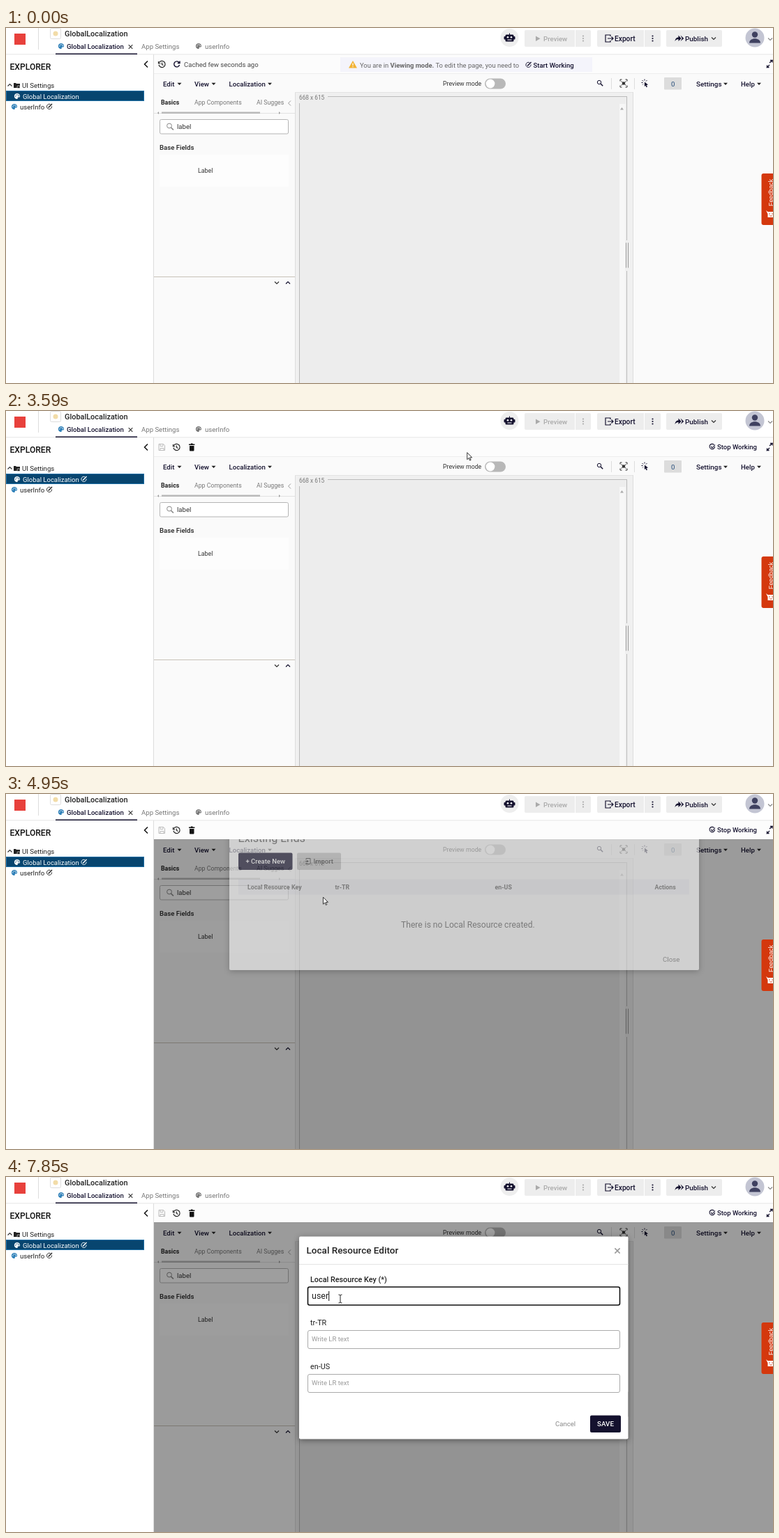
These frames come from a looping animation (1099 px wide and 510 px high, 8000 ms). An HTML page:

```html
<!DOCTYPE html>
<html lang="en">
<head>
<meta charset="utf-8">
<title>Local resource editor walkthrough</title>
<style>
html, body { margin: 0; width: 100%; height: 100%; overflow: hidden; background: #fff; }
svg { display: block; width: 1099px; height: 510px; font-family: Roboto, sans-serif; }
text { white-space: pre; }
.shadow { filter: drop-shadow(0 2px 4px rgba(0,0,0,.4)); }
</style>
</head>
<body>
<script>
const INK = '#14112e', GRAY = '#777';

// Static drawing helpers; text is placed by the middle of its capitals.
const text = (x, y, s, size = 9.6, fill = '#222', weight = 400) =>
  `<text x="${x}" y="${y + size * .345}" font-size="${size}" fill="${fill}" font-weight="${weight}">${s}</text>`;
const rect = (x, y, w, h, fill, r = 0, stroke = 'none', sw = 1) =>
  `<rect x="${x}" y="${y}" width="${w}" height="${h}" rx="${r}" fill="${fill}" stroke="${stroke}" stroke-width="${sw}"/>`;
const circle = (x, y, r, fill, stroke = 'none') =>
  `<circle cx="${x}" cy="${y}" r="${r}" fill="${fill}" stroke="${stroke}"/>`;
const line = (d, stroke = '#222', w = 1.2, fill = 'none') =>
  `<path d="${d}" stroke="${stroke}" stroke-width="${w}" fill="${fill}"/>`;
const shape = (d, fill = '#222') => `<path d="${d}" fill="${fill}"/>`;
const group = (id, body) => `<g id="${id}">${body}</g>`;
const at = (x, y, body) => `<g transform="translate(${x} ${y})">${body}</g>`;

const caret = (x, y) => shape(`M${x - 3} ${y - 1.5}h6l-3 3.2z`);
const chevron = (x, y, dir, color = '#333') => line(`M${x - 3} ${y - 1.5 * dir}l3 ${3 * dir}l3 ${-3 * dir}`, color, 1.2);
const cross = (x, y, r, color, w = 1.5) => line(`M${x - r} ${y - r}l${2 * r} ${2 * r}m0 ${-2 * r}l${-2 * r} ${2 * r}`, color, w);
const dots = (x, y, color) => [-3.5, 0, 3.5].map(d => circle(x, y + d, 1.1, color)).join('');
const palette = (x, y, fill, hole = '#fff') => at(x, y,
  shape('M0 -4C-5.5 -4 -5.5 4 0 4C1.6 4 .2 2 1.2 1.6C2.4 1.2 4 2 4 0C4 -2.8 2.2 -4 0 -4z', fill) +
  [[-2.2, 0], [-1, -2.1], [1.1, -2.1], [2.4, -.5]].map(([a, b]) => circle(a, b, .7, hole)).join(''));
const editIcon = (x, y, color) => at(x, y,
  line('M1.5 -3.4A3.6 3.6 0 1 0 3.6 -.5', color, .9) + line('M-1.4 1.4L4 -4', color, 1.4));
const history = (x, y) => at(x, y, line('M-4 -2.4A4.6 4.6 0 1 1 -4.5 1M-5 -4v3h3M0 -2.6V.4l2 1.2'));
const lens = (x, y, r, color) => at(x, y, circle(-1, -1, r, 'none', color) + line(`M${r * .6 - .6} ${r * .6 - .6}L${r + 1.5} ${r + 1.5}`, color, 1.5));
const menu = (x, y, s, arrowX) => text(x, y, s, 9.6, INK, 500) + caret(arrowX, y);

const robot = shape('M-4.5 -4.5h4v-2h1v2h4a1.5 1.5 0 0 1 1.500 1.500v7a1.500 1.500 0 0 1 -1.500 1.500h-9a1.500 1.500 0 0 1 -1.500 -1.500v-7a1.500 1.500 0 0 1 1.500 -1.500z', INK) +
  rect(-8, -2, 16, 4.5, INK, 1) + circle(-2.5, -.8, 1.3, '#fff') + circle(2.5, -.8, 1.3, '#fff') + rect(-3, 2.5, 6, 1, '#fff');

const header =
  rect(0, 0, 1099, 38, '#fff') + rect(12, 8, 16, 16, '#e8413c') + rect(46, 0, 1, 31, '#ddd') +
  rect(63.5, .5, 15, 15, '#fff', 2, '#ddd') + circle(71, 8, 3.5, '#f2dca8') +
  text(84, 8.5, 'GlobalLocalization', 10.9, '#222', 500) +
  palette(79, 26, '#2c7fb8') + text(87, 26.5, 'Global Localization', 9.55, INK, 500) + cross(178.5, 27, 2.8, '#333', 1.1) +
  text(194, 26.5, 'App Settings', 9.6, GRAY) + palette(276, 26, GRAY) + text(285, 26.5, 'userInfo', 9.6, GRAY) +
  rect(0, 37.5, 1099, 1, '#ddd') + rect(71, 36.5, 117, 1.5, INK) +
  circle(721.5, 14, 13, '#eee') + at(721.5, 14, robot) +
  rect(743, 3, 95, 24, '#ededed', 2) + rect(815, 3, 1, 24, '#fff') + shape('M759 11.5v7.500l6.500 -3.750z', '#aaa') +
  text(770, 15.5, 'Preview', 9.7, '#aaa', 500) + dots(827, 15, '#aaa') +
  rect(847, 3, 91, 24, '#ededed', 2) + rect(914, 3, 1, 24, '#fff') +
  line('M866 12v-2h-7v10h7v-2M862 15h8m-2.500 -2.500l2.500 2.500l-2.500 2.500', INK, 1.2) +
  text(872, 15.5, 'Export', 10.2, INK, 500) + dots(926.5, 15, INK) +
  rect(946, 3, 80, 24, '#ededed', 2) +
  shape('M958.500 19c.5-4 2.500-5.500 5-5.500v-3l4 4.500l-4 4v-3c-2 0-3.500 .8-5 3zM966.500 10.500l4.800 4.500l-4.800 4l2.200 -4z', INK) +
  text(973, 15.5, 'Publish', 9.9, INK, 500) + chevron(1014, 15, 1) +
  circle(1073, 14, 13.5, '#c3c5d3') + circle(1073, 9.500, 4.2, '#3f4160') + shape('M1065 21.500c0-8.500 16-8.500 16 0z', '#3f4160') + chevron(1095, 16, 1, '#888');

const explorer =
  rect(0, 38.500, 211, 472, '#fff') + text(5.500, 55.5, 'EXPLORER', 12.1, '#111', 500) +
  line('M203 47.500l-4.500 4.500l4.500 4.500', '#111', 1.5) +
  chevron(5.500, 82, -1) + shape('M11 79h3l1 1h5v6h-9z') + rect(16, 83, 4, 3.5, '#222', 1, '#fff', .6) +
  text(23, 82.5, 'UI Settings') +
  rect(.5, 90.5, 197, 14, '#07456f', 0, '#1d6ea5') + palette(16, 98, '#fff', '#07456f') +
  text(24, 98.3, 'Global Localization', 9.5, '#fff') + group('rowEdit', editIcon(111.500, 98, '#fff')) +
  palette(12, 113, '#2c7fb8') + text(20, 113.3, 'userInfo') + editIcon(62, 113, '#222') +
  rect(211, 38, 1, 472, '#ddd');

const viewingBar = history(223.500, 52) +
  line('M248 49.500a4 4 0 1 0 .6 3.500M249 47.500v3h-3.200', INK, 1.4) + text(255, 52.5, 'Cached few seconds ago', 9.55, '#444') +
  rect(479, 42, 361, 21, '#f4f4fb') + shape('M497 47l6 10.500h-12z', '#f2b233') + rect(496.400, 50.500, 1.2, 3.5, '#fff') + rect(496.400, 55, 1.2, 1.2, '#fff') +
  text(507, 53.3, 'You are in <tspan font-weight="700">Viewing mode.</tspan> To edit the page, you need to', 9.42, '#666') +
  editIcon(748.500, 53, INK) + text(755.500, 53.3, 'Start Working', 9.5, INK, 500);

const workingBar =
  line('M219 47.500h6.500l2 2v7h-8.500zM221 47.500v3h4v-3M221 56.500v-3h5v3', '#bbb', 1) + history(244.500, 52) +
  shape('M262 47.500h2.500l.7-1h2l.7 1h2.500v1.500h-8.400zM263 50h6.500v6c0 1-.5 1.500-1.300 1.500h-4c-.8 0-1.200-.5-1.200-1.500z', '#111') +
  line('M1014.500 48.500a3.700 3.700 0 1 0 1 2.500M1010 51l2 2l4-4.500', INK, 1.1) +
  text(1019, 52, 'Stop Working', 9.5, INK, 500);

const toolbar = rect(212, 38.500, 887, 27, '#fcfcfc') + group('viewing', viewingBar) + group('working', workingBar) +
  line('M1094 50l4-3.500h-3m3 0v3M1094 53l-3.500 3.500h3m-3 0v-3', INK, 1.3);

const menubar = rect(212, 65, 887, 27.5, '#fafafa') + rect(212, 65, 887, 1, '#eee') +
  menu(225, 80.3, 'Edit', 248.500) + menu(270, 80.3, 'View', 297.500) + menu(319.500, 80.3, 'Localization', 378) +
  text(626, 80.3, 'Preview mode', 8.8, '#333') + rect(686, 72.5, 30, 15, '#b8b8b8', 7.5) + circle(694, 80, 6.4, '#fff') +
  lens(851, 79, 2.7, INK) + rect(867, 72, 1, 16, '#ddd') + rect(900, 72, 1, 16, '#ddd') +
  at(885, 79.500, line('M-5 -3v-2.500h2.500M5 -3v-2.500h-2.500M-5 3v2.500h2.500M5 3v2.500h-2.500', '#333', 1) +
    circle(0, 0, 2.2, '#333') + line('M-3.500 -3l7 6m0 -6l-7 6', '#333', 1)) +
  at(915, 78.500, shape('M0 -1l5 4l-2.300 .5l1.300 2.500l-1.500 .7l-1.200 -2.600l-1.500 1.600z', INK) + line('M0 -3v-2M-2 -2l-1.500 -1.500M2 -2l1.500 -1.500M-2.500 0h-2M-2 2l-1 1', INK, 1)) +
  rect(943, 71, 25, 17.5, '#dcdcdc', 1) + text(953, 80.3, '0', 9.6, '#234a78') +
  text(989, 80.3, 'Settings', 9.9, INK, 500) + caret(1031, 80.3) + text(1053, 80.3, 'Help', 9.6, INK, 500) + caret(1079, 80.3);

const panel = rect(212, 92, 202, 418, '#fafafa') +
  text(222, 107.3, 'Basics', 8.8, '#222', 700) + text(270, 107.3, 'App Components', 8.75, GRAY) +
  text(359, 107.3, 'AI Sugges', 8.75, GRAY) + line('M408 104.500l-3.500 3.500l3.500 3.500', '#999', 1) +
  rect(212, 122, 202, 1, '#e2e2e2') + rect(223, 120.5, 141, 2.5, '#b9b9b9') +
  shape('M219 120v4l-2-2zM391 120v4l2-2z', '#999') +
  rect(220.5, 131.5, 184, 20.5, '#fff', 2, '#b5b5b5') + lens(235, 141.500, 3.4, '#888') + text(245, 141.8, 'label', 9.6, '#333') +
  text(220, 171.8, 'Base Fields', 9.6, '#222', 500) +
  rect(220, 182, 185, 46, '#fdfdfd') + text(275, 205, 'Label', 8.8, '#333') +
  rect(212, 357, 202, 1, '#c8c2b8') + chevron(388, 366, 1) + chevron(404, 366, -1, INK);

const stage = rect(414, 92, 485, 418, '#f0f0f0') + rect(421, 108, 458, 402, '#ededed') + rect(421, 99, 468, 10, '#ededed') +
  rect(414, 92, 1, 418, '#ddd') + rect(414, 92, 685, 1, '#e4e4e4') +
  text(420, 100.500, '668 x 615', 8.3, '#777') + rect(461, 98, 429, 1, '#bbb') + rect(420, 108, 1, 402, '#bbb') +
  rect(879, 109, 8, 401, '#f7f7f7') + shape('M880 117.500l2.500-3.500l2.500 3.500z', '#aaa') +
  rect(889, 98, 1, 207, '#bbb') + rect(889, 349, 1, 161, '#bbb') + rect(888, 308.5, 1, 36, '#999') + rect(891, 308.5, 1, 36, '#999') +
  rect(899, 92, 200, 418, '#fafafa') + rect(898, 92, 1, 418, '#ddd');

const dropdown = rect(313, 71.500, 79, 18, '#fff', 2, '#ddd') +
  `<g class="shadow">${rect(313, 90, 134, 79, '#fff', 1)}</g>` + rect(313, 88, 79, 3, '#fff') +
  group('hover', rect(313, 97, 134, 21.5, '#e0e0e0')) +
  menu(319.500, 80.3, 'Localization', 378) +
  text(319.500, 107.5, 'Local Resources', 9.4, INK, 500) + text(319.500, 129.3, 'Languages', 9.45, INK, 500) +
  shape('M432 126.500l3.500 2.500l-3.500 2.500z') + text(319.500, 151.3, 'Add Language', 9.5, INK, 500);

const listDialog = `<g class="shadow">${rect(320, 82, 673, 252.5, '#fdfdfd', 2)}</g>` +
  text(329.500, 102, 'Local Resource Editor', 13.5, '#222', 500) + cross(977.500, 102.500, 3.6, '#999') + rect(320, 121.5, 673, 1, '#e4e4e4') +
  text(332.500, 145, 'Existing Lrids', 16.2, '#555') +
  rect(333, 166, 77.5, 24.5, INK, 2) + text(343.500, 178.3, '+ Create New', 9.45, '#fff', 500) +
  rect(417, 166, 63, 24.5, '#c8c8c8', 2) + line('M430 176v-2h6v8h-6v-2M428.500 178h4.500m-1.500 -1.500l1.500 1.500l-1.500 1.500', '#444', 1) +
  text(440.500, 178.3, 'Import', 9.5, '#444', 500) +
  rect(333, 204, 646, 22, '#f2f2f6') +
  [[346, 'Local Resource Key'], [471.500, 'tr-TR'], [700.500, 'en-US'], [929.500, 'Actions']].map(([x, s]) => text(x, 215.2, s, 8.8, '#666', 700)).join('') +
  text(566, 269, 'There is no Local Resource created.', 12.1, '#666') + text(941, 319, 'Close', 9.7, '#777');

const field = (y, label, stroke, w) => text(436, y - 24, label, 10.8, '#222', w > 1 ? 500 : 400) +
  rect(432.500, y - 13, 447, 26, '#fff', 2.5, stroke, w);
const editDialog = `<g class="shadow">${rect(420, 85.500, 471.5, 291, '#fff', 2)}</g>` +
  text(430.500, 105.4, 'Local Resource Editor', 13.5, '#222', 500) + cross(876, 106, 3.6, '#999') + rect(420, 125, 471.5, 1, '#e4e4e4') +
  field(171, 'Local Resource Key (*)', '#111', 1.6) + field(233.5, 'tr-TR', '#aaa', 1) + field(296.5, 'en-US', '#aaa', 1) +
  text(438, 232.8, 'Write LR text', 9.5, '#999') + text(438, 296, 'Write LR text', 9.5, '#999') +
  `<text id="typed" x="438" y="175" font-size="12.500" fill="#222"></text>` + group('beam', rect(0, 164, 1, 14, '#111')) +
  text(787, 355, 'Cancel', 9.6, '#888') + group('save', rect(837, 342.5, 44, 24.5, INK, 2) + text(847, 355, 'SAVE', 9.8, '#fff', 500));

const feedback = rect(1082.5, 209, 20, 74, '#d4380d', 3) +
  `<text transform="translate(1098.500 256) rotate(-90)" font-size="8.900" fill="#fff" font-family="Liberation Sans, Arial, sans-serif">Feedback</text>` +
  shape('M1089 262l2.500 2h8v8h-8v-5z', '#fff') + circle(1094, 267, .8, '#d4380d') + circle(1098, 267, .8, '#d4380d') + line('M1094 269.500q2 1.500 4 0', '#d4380d', .8);

const cursors =
  group('arrow', line('M0 0v10l2.300-2.200l1.600 3.500l1.500-.7l-1.600-3.400h3.200z', '#222', .9, '#fff')) +
  group('hand', line('M-1 .8c0-1.200 1.800-1.200 1.800 0v4.200c.6-.8 1.700-.5 1.700 .3c.5-.6 1.500-.4 1.500 .4c.6-.5 1.300-.1 1.300 .6v3.200l-1.200 3.700h-5.200c-1-2-2.300-3.500-3.300-5.200c-.4-1 .8-1.500 1.600-.7l1.800 1.500z', '#222', .9, '#fff')) +
  group('ibeam', line('M-2.500 -6q2.500 0 2.500 1.500v9q0 1.500 -2.500 1.500M2.500 -6q-2.500 0 -2.500 1.500m0 9q0 1.500 2.500 1.500', '#222', 1));

document.body.innerHTML = `<svg viewBox="0 0 1099 510">
  <defs>
    <clipPath id="work"><rect x="212" y="65" width="887" height="445"/></clipPath>
    <linearGradient id="veilFill">${[[0, .36], [.2, .5], [.4, .66], [.7, .62], [.92, .33], [1, .33]].map(([o, a]) =>
      `<stop offset="${o}" stop-color="#fff" stop-opacity="${a}"/>`).join('')}</linearGradient>
  </defs>
  ${header + explorer + toolbar + menubar + panel + stage}
  ${group('menu', dropdown)}
  <g clip-path="url(#work)">${group('dim', rect(212, 65, 887, 445, '#000')) + group('list', listDialog) + group('edit', editDialog)}</g>
  ${group('veil', rect(0, 0, 1099, 510, 'url(#veilFill)') + rect(524, 240, 60, 59, INK))}
  ${feedback}
  ${group('click', circle(0, 0, 8, '#eadb0c'))}
  ${group('pointer', cursors)}
</svg>`;

const el = id => document.getElementById(id);
const show = (id, opacity) => el(id).setAttribute('opacity', +opacity);
const move = (id, x, y) => el(id).setAttribute('transform', `translate(${x} ${y})`);
const ramp = (t, from, to) => Math.min(1, Math.max(0, (t - from) / (to - from)));
const within = (t, from, to) => t >= from && t < to;

// Pointer stops: time, x, y
const route = [
  [210, 1066, 498], [540, 870, 281], [740, 870, 281], [880, 848, 280], [1210, 848, 279], [1350, 785, 118],
  [1560, 785, 117], [1910, 782, 57], [3480, 781, 56], [3720, 521, 64], [3790, 510, 65], [4120, 350, 79],
  [4270, 352, 83], [4340, 378, 134], [4480, 368, 108], [4780, 368, 108], [4950, 454, 148], [5160, 546, 191],
  [5320, 546, 191], [5480, 455, 191], [5550, 453, 190], [5960, 388, 177], [6450, 388, 177], [6840, 474, 171],
  [6910, 474, 171], [6980, 479, 175], [8000, 479, 175]];
const clicks = [2110, 4050, 4690, 6100];
const keys = [7380, 7590, 7780, 7850];

function pointerAt(t) {
  const i = Math.max(1, route.findIndex(stop => stop[0] > t));
  const [a, b] = [route[i - 1], route[i]];
  const p = ramp(t, a[0], b[0]);
  return [1, 2].map(k => a[k] + (b[k] - a[k]) * p);
}

function draw(t) {
  const working = t >= 2700;
  show('viewing', !working);
  show('working', working);
  show('rowEdit', working);
  show('veil', ramp(t, 2250, 2480) * (1 - ramp(t, 3350, 3560)));

  const [x, y] = pointerAt(t);
  show('menu', within(t, 4085, 4820));
  show('hover', y > 97);
  move('hover', 0, y > 118.5 ? 21.5 : 0);

  show('dim', .38 * ramp(t, 4780, 4920));
  const drop = ramp(t, 4890, 5150);
  show('list', ramp(t, 4885, 5005) * (1 - ramp(t, 6180, 6300)));
  move('list', 0, -139 * (1 - drop) ** 2);
  show('edit', ramp(t, 6330, 6540));

  const typed = 'user'.slice(0, keys.filter(k => t >= k).length);
  el('typed').textContent = typed;
  move('beam', 438 + (typed ? el('typed').getComputedTextLength() : 0), 0);
  show('save', typed ? 1 : .55);

  const hand = within(t, 1840, 2450) || within(t, 5830, 6450);
  const ibeam = t >= 6900;
  show('hand', hand);
  show('ibeam', ibeam);
  show('arrow', !hand && !ibeam);
  show('pointer', t >= 210);
  move('pointer', x, y);

  const last = clicks.filter(c => t >= c).pop() ?? -1e4;
  show('click', .9 * (1 - ramp(t - last, 40, 240)));
  move('click', x, y + 1);
}

const start = performance.now();
(function tick() {
  draw((performance.now() - start) % 8000);
  requestAnimationFrame(tick);
})();
</script>
</body>
</html>
```
